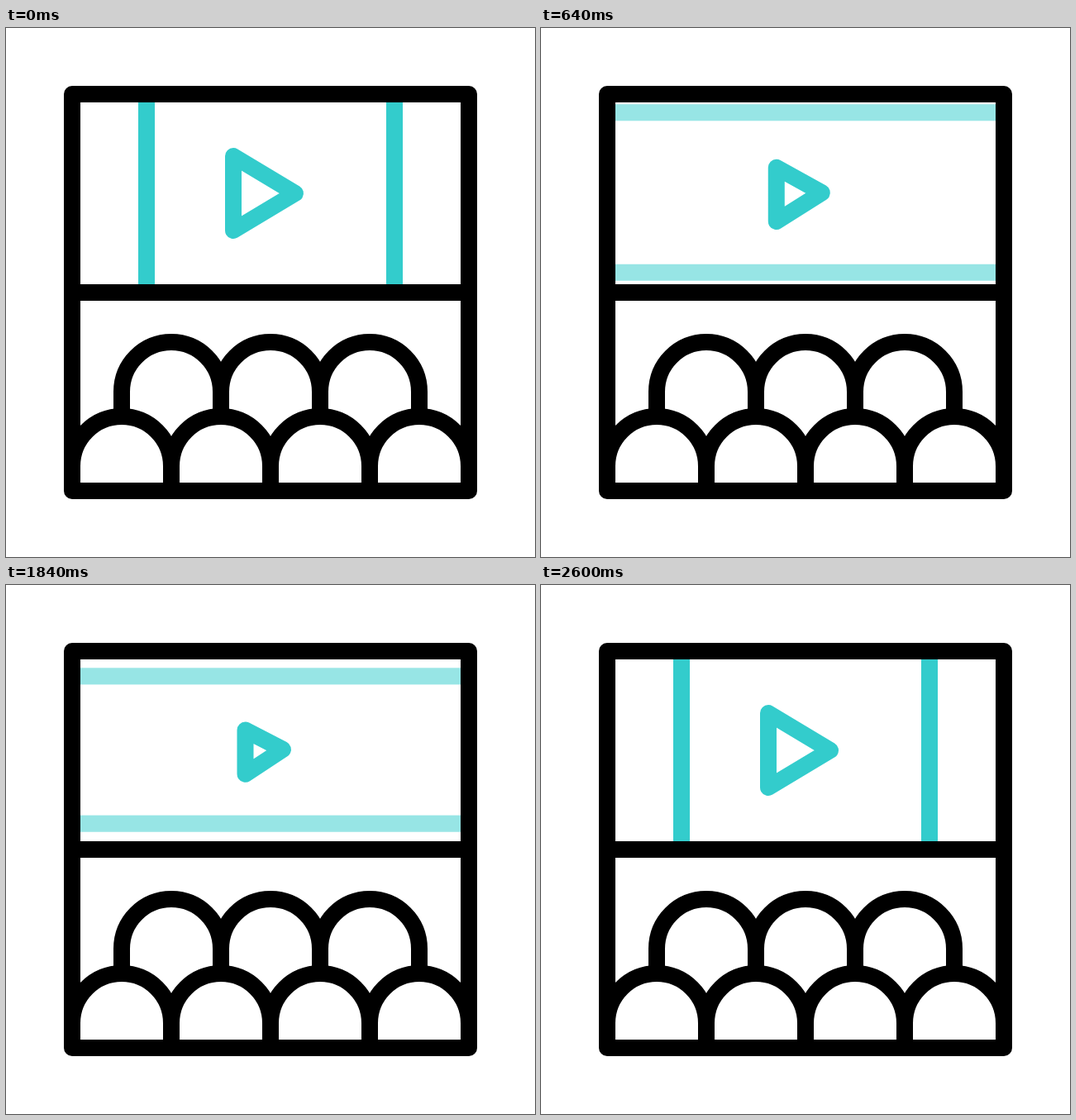
These frames come from a looping animation (640x640 px, 3000 ms). An HTML page:

```html
<!DOCTYPE html>
<html lang="en">
<head>
<meta charset="utf-8">
<title>Cinema</title>
<style>
  html, body { margin: 0; width: 100%; height: 100%; overflow: hidden; background: #fff; }
  svg { display: block; width: 100%; height: 100%; }
  path { fill: none; stroke: #000; stroke-width: 20; stroke-linejoin: round; }
  .screen path { stroke: #33cccc; animation: 3s linear infinite; }

  .left { --out: -122px; }
  .right { --out: 122px; }
  .screen .curtain { animation-name: curtain; }
  @keyframes curtain {
    0%, 3.73%, 86.67%, 100% { transform: none; }
    21.5%, 68.9% { transform: translateX(var(--out)); }
  }

  .top { --from: -41px; --to: -24px; }
  .bottom { --from: 39px; --to: 24px; }
  .screen .band { animation-name: band; }
  @keyframes band {
    0%, 14.37% { transform: translateY(var(--from)); opacity: 0; }
    28%, 54.47% { transform: none; opacity: 1; }
    68.5%, 100% { transform: translateY(var(--to)); opacity: 0; }
  }

  .screen .play { animation-name: play; }
  @keyframes play {
    0%, 8.83%, 86.67%, 100% { d: path("M275 155L350 200L275 245Z"); }
    27.43%, 68.9% { d: path("M289.5 175.5L335 199L289.5 228.8Z"); }
  }
</style>
</head>
<body>
<svg viewBox="0 0 640 640">
  <clipPath id="view"><rect x="85" y="85" width="470" height="230"/></clipPath>
  <g class="screen" clip-path="url(#view)">
    <path class="band top" d="M80 122.2H560"/>
    <path class="band bottom" d="M80 276.7H560"/>
    <path class="curtain left" d="M170 80V320"/>
    <path class="curtain right" d="M470 80V320"/>
    <path class="play" d="M275 155L350 200L275 245Z"/>
  </g>
  <path d="M80 80H560V560H80ZM80 320H560"/>
  <path d="M140 470V440a60 60 0 0 1 120 0V470M260 440a60 60 0 0 1 120 0V470M380 440a60 60 0 0 1 120 0V470"/>
  <path d="M80 560V530a60 60 0 0 1 120 0V560M200 530a60 60 0 0 1 120 0V560M320 530a60 60 0 0 1 120 0V560M440 530a60 60 0 0 1 120 0V560"/>
</svg>
</body>
</html>
```
